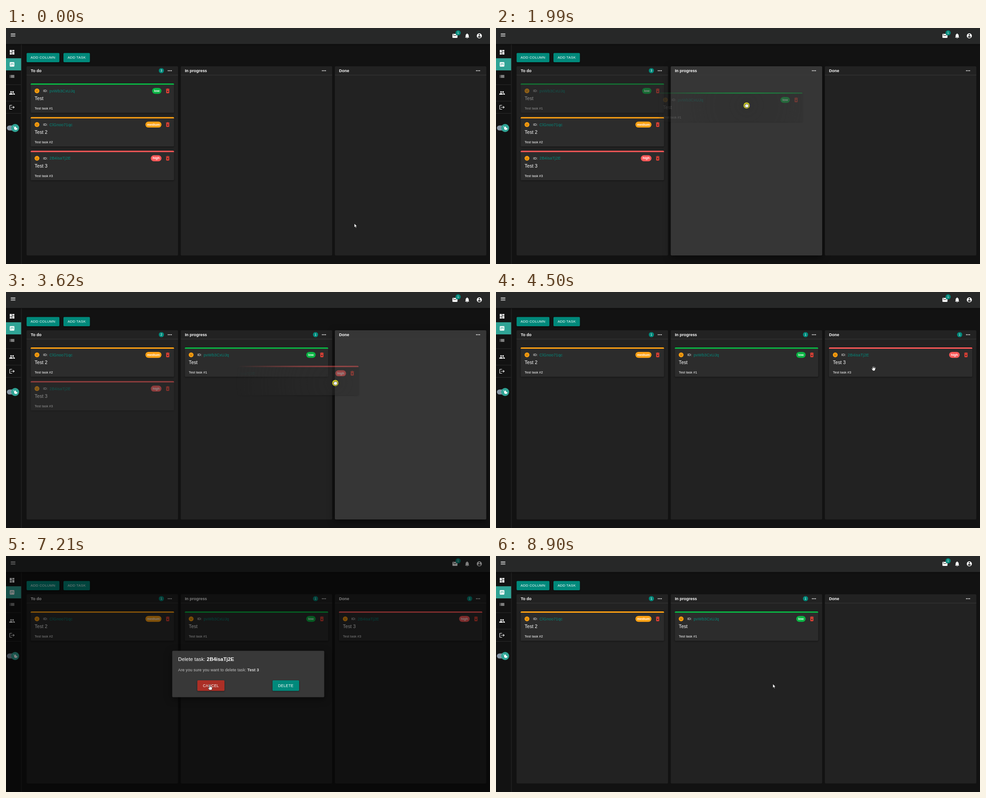
These frames come from a looping animation (1070 by 524 pixels, 9.3 s). An HTML page:

```html
<!DOCTYPE html>
<html lang="en">
<head>
<meta charset="utf-8">
<title>Task board</title>
<style>
html, body { margin: 0; width: 100%; height: 100%; overflow: hidden; background: #121212; }
svg { display: block; width: 100vw; height: 100vh; font-family: "Liberation Sans", Arial, sans-serif; fill: #fff; }
.b { font-weight: bold; }
.m { text-anchor: middle; }
.lift { filter: drop-shadow(0 1px 1.5px rgba(0,0,0,.5)); }
.high { filter: drop-shadow(0 4px 8px rgba(0,0,0,.5)); }
</style>
</head>
<body>
<svg id="stage" viewBox="0 0 1070 524" xmlns="http://www.w3.org/2000/svg"></svg>
<script>
const LOOP = 9300, STEP = 69.5;
const TEAL = '#00897b', MINT = '#30a395', RED = '#f44336';
const COL_X = [45.5, 386.3, 727], COL_W = 334.8;
const CARD_X = 9, CARD_Y = 123, CARD_W = 317, CARD_H = 65.3, PITCH = 74.8;

const ICON = {
  menu: 'M3 18h18v-2H3v2zm0-5h18v-2H3v2zm0-7v2h18V6H3z',
  grid: 'M3 13h8V3H3v10zm0 8h8v-6H3v6zm10 0h8V11h-8v10zm0-18v6h8V3h-8z',
  board: 'M5 3h14a2 2 0 0 1 2 2v14a2 2 0 0 1-2 2H5a2 2 0 0 1-2-2V5a2 2 0 0 1 2-2zM7 7v10h2V7zM11 7v5h2V7zM15 7v8h2V7z',
  list: 'M3 13h2v-2H3v2zm0 4h2v-2H3v2zm0-8h2V7H3v2zm4 4h14v-2H7v2zm0 4h14v-2H7v2zM7 7v2h14V7H7z',
  people: 'M16 11c1.66 0 3-1.34 3-3s-1.34-3-3-3-3 1.34-3 3 1.34 3 3 3zm-8 0c1.66 0 3-1.34 3-3S9.66 5 8 5 5 6.34 5 8s1.34 3 3 3zm0 2c-2.33 0-7 1.17-7 3.5V19h14v-2.5c0-2.33-4.67-3.5-7-3.5zm8 0c-.29 0-.62.02-.97.05 1.16.84 1.97 1.97 1.97 3.45V19h6v-2.5c0-2.33-4.67-3.5-7-3.5z',
  exit: 'M17 7l-1.41 1.41L18.17 11H8v2h10.17l-2.58 2.58L17 17l5-5zM4 5h8V3H4c-1.1 0-2 .9-2 2v14c0 1.1.9 2 2 2h8v-2H4V5z',
  mail: 'M20 4H4c-1.1 0-2 .9-2 2v12c0 1.1.9 2 2 2h16c1.1 0 2-.9 2-2V6c0-1.1-.9-2-2-2zm0 4l-8 5-8-5V6l8 5 8-5v2z',
  bell: 'M12 22c1.1 0 2-.9 2-2h-4c0 1.1.89 2 2 2zm6-6v-5c0-3.07-1.64-5.64-4.5-6.32V4c0-.83-.67-1.5-1.5-1.5s-1.5.67-1.5 1.5v.68C7.63 5.36 6 7.92 6 11v5l-2 2v1h16v-1l-2-2z',
  user: 'M12 2a10 10 0 1 0 0 20 10 10 0 0 0 0-20zm0 3a3 3 0 1 1 0 6 3 3 0 0 1 0-6zm0 14.2c-2.5 0-4.71-1.28-6-3.22.03-1.99 4-3.08 6-3.08s5.97 1.09 6 3.08c-1.29 1.94-3.5 3.22-6 3.22z',
  trash: 'M6 19c0 1.1.9 2 2 2h8c1.1 0 2-.9 2-2V7H6v12zm2.46-7.12l1.41-1.41L12 12.59l2.12-2.12 1.41 1.41L13.41 14l2.12 2.12-1.41 1.41L12 15.41l-2.12 2.12-1.41-1.41L10.59 14l-2.13-2.12zM15.5 4l-1-1h-5l-1 1H5v2h14V4z',
  dots: 'M6 10a2 2 0 1 0 0 4 2 2 0 0 0 0-4zm6 0a2 2 0 1 0 0 4 2 2 0 0 0 0-4zm6 0a2 2 0 1 0 0 4 2 2 0 0 0 0-4z',
  moon: 'M6.2 4.5l-.7 1.8-1.8.7 1.8.7.7 1.8.6-1.8L8.7 7l-1.9-.7zm15 8.3a6.7 6.7 0 1 1-6.6-6.6 5.8 5.8 0 0 0 6.6 6.6z'
};

const icon = (name, x, y, fill = '#fff', s = .56) =>
  `<path d="${ICON[name]}" fill="${fill}" fill-rule="evenodd" transform="translate(${x} ${y}) scale(${s}) translate(-12 -12)"/>`;
const rect = (x, y, w, h, fill, r = 0, more = '') =>
  `<rect x="${x}" y="${y}" width="${w}" height="${h}" fill="${fill}" rx="${r}" ${more}/>`;
const text = (x, y, size, str, more = '') =>
  `<text x="${x}" y="${y}" font-size="${size}" ${more}>${str}</text>`;
const badge = (x, y, id, str) =>
  `<g id="${id}"><circle cx="${x}" cy="${y}" r="5.7" fill="${TEAL}"/>${text(x, y + 2.5, 7, str, 'class="m"')}</g>`;
const button = (x, y, w, h, fill, label, size, id = '') =>
  rect(x, y, w, h, fill, 2, `class="lift" id="${id}"`) +
  text(x + w / 2, y + h / 2 + size * .355, size, label, `class="m" letter-spacing="${size * .0285}"`);

const CARDS = [
  { id: 'pvWb3CxUJq', title: 'Test', level: 'low', color: '#0ab443', pill: 20.7 },
  { id: 'ClGnoo71qc', title: 'Test 2', level: 'medium', color: '#ffa113', pill: 35.5 },
  { id: '2B4isaTj2E', title: 'Test 3', level: 'high', color: '#fb5858', pill: 23.5 }
];

const card = (c, i) => `<g id="card${i}"><g id="face${i}">
  <g class="lift">${rect(0, 0, CARD_W, CARD_H, '#2c2c2c', 2)}</g>
  <path d="M0 3V2a2 2 0 0 1 2-2H${CARD_W - 2}a2 2 0 0 1 2 2V3z" fill="${c.color}"/>
  <circle cx="14" cy="16.6" r="5.3" fill="#ffa00f"/>
  ${text(14, 19, 6.6, 'U', 'class="m" fill="#6b4300"')}
  ${text(27.6, 19.3, 7.84, 'ID:')}
  ${text(41.6, 19.8, 9, c.id, `fill="${TEAL}" letter-spacing=".1"`)}
  ${rect(289.2 - c.pill, 9.9, c.pill, 13.4, c.color, 6.7)}
  ${text(289.2 - c.pill / 2, 18.9, 7.28, c.level, 'class="m b"')}
  ${icon('trash', 303, 16.6, RED)}
  ${text(8.8, 37, 10.6, c.title)}
  ${text(8.8, 58, 7.6, 'Test task #' + (i + 1))}
</g></g>`;

const column = (name, i) => `<g transform="translate(${COL_X[i]} 0)">
  ${rect(0, 85, COL_W, 420, '#222', 2, `id="col${i}"`)}
  ${rect(0, 104, COL_W, 1, '#393939')}
  ${text(9.3, 97.7, 8.96, name, 'class="b"')}
  ${badge(298, 94.6, 'count' + i, '')}
  ${icon('dots', 316.6, 94.8)}
</g>`;

const HAND = 'M-4.6 .6C-5.4-.6-3.9-1.4-3.1-.2L-2.4.8-3.2-3.2C-3.4-4.5-2-4.6-1.7-3.4L-1.1-1.2-1-4.3C-.9-5.5.5-5.5.6-4.3L.7-1.2 1.5-3.8C1.8-4.8 3-4.5 2.8-3.4L2.4-.6 3.4-2.2C4-3.1 5-2.5 4.6-1.5L3.3 2.3 2.3 5H-1.8z';
const FIST = 'M-4.2 .2C-4.4-1-3.2-1.4-2.8-.6V-2.2C-2.6-3.5-1.3-3.4-1.1-2.6-.8-3.7.6-3.6.8-2.6 1.2-3.4 2.4-3.2 2.5-2.2 3-2.8 4.2-2.4 4.2-1.4V1.4L3.2 4.4H-2.2z';
const POINT = 'M-.9-1C-.9-2.2.9-2.2.9-1V3.2L4.9 4.1C5.8 4.4 6 5 5.9 5.8L5 10.4H-.2L-3.4 6.6C-3.8 5.6-2.6 5-1.8 5.7L-.9 6.5z';
const shape = (id, d) => `<path id="${id}" d="${d}" stroke="#111" stroke-width=".7" stroke-linejoin="round"/>`;

document.getElementById('stage').innerHTML = `
<defs>
  <radialGradient id="fade" gradientUnits="userSpaceOnUse" cx="0" cy="0" r="220">
    <stop offset="0" stop-color="#fff" stop-opacity=".55"/>
    <stop offset=".4" stop-color="#fff" stop-opacity=".4"/>
    <stop offset="1" stop-color="#fff" stop-opacity="0"/>
  </radialGradient>
  <mask id="soft" maskUnits="userSpaceOnUse" x="-20" y="-20" width="360" height="110">
    ${rect(-20, -20, 360, 110, 'url(#fade)')}
  </mask>
</defs>
${rect(0, 0, 1070, 524, '#121212')}
${rect(33.5, 36, 1, 488, '#2b2b2b')}
<g class="lift">${rect(0, 0, 1070, 35.6, '#272828')}</g>
${icon('menu', 15.6, 15.7)}
${icon('mail', 992.5, 17.4)}${badge(999.5, 10.7, 'mailCount', '1')}
${icon('bell', 1019.5, 17.4)}${icon('user', 1046.4, 17.4)}
${rect(0, 67.2, 33.5, 26.9, MINT)}
${icon('grid', 13.4, 53.9)}${icon('board', 13.4, 80.7)}${icon('list', 13.4, 107.5)}
${icon('people', 13.4, 144.2)}${icon('exit', 13.4, 176)}
${[125.3, 161.8, 189].map(y => rect(0, y, 33.5, 1, '#2b2b2b')).join('')}
${rect(2, 216.4, 24, 11.2, '#8796a5', 5.6)}
<circle cx="20.2" cy="222" r="8.9" fill="${MINT}"/>${icon('moon', 20.2, 222, '#fff', .55)}
${button(45.5, 55.4, 72.6, 20.6, TEAL, 'ADD COLUMN', 7.84)}
${button(127, 55.4, 58.5, 20.6, TEAL, 'ADD TASK', 7.84)}
${['To do', 'In progress', 'Done'].map(column).join('')}
${CARDS.map(card).join('')}
<g id="ghost" mask="url(#soft)"><use id="ghostFace"/></g>
${rect(0, 0, 1070, 524, '#000', 0, 'id="shade"')}
<g id="dialog">
  <g class="high">${rect(367.5, 210.6, 336, 102.8, '#383838', 2)}</g>
  ${text(380.6, 232.6, 11.2, 'Delete task: <tspan class="b">2B4isaTj2E</tspan>', 'letter-spacing=".08"')}
  ${text(380.6, 256.1, 8.96, 'Are you sure you want to delete task: <tspan class="b" fill="#dcdcdc">Test 3</tspan>', 'letter-spacing=".084" fill="#c3c3c3"')}
  ${button(423, 276, 60, 23.6, RED, 'CANCEL', 8.4, 'cancel')}
  ${button(589.2, 276, 58.8, 23.6, TEAL, 'DELETE', 8.4, 'remove')}
</g>
<g id="cursor">
  <circle id="press" r="6.8" fill="#d6d422"/>
  ${shape('arrow', 'M0 0V8.8L2 7 3.4 10.1 4.9 9.4 3.5 6.4H6.2z')}
  ${shape('hand', HAND)}${shape('fist', FIST)}${shape('point', POINT)}
  <g id="no" fill="none"><circle r="4.2" stroke="#222" stroke-width="2.6"/><path d="M-3-3L3 3" stroke="#222" stroke-width="2.6"/>
  <circle r="4.2" stroke="#e8e46a" stroke-width="1.2"/><path d="M-3-3L3 3" stroke="#e8e46a" stroke-width="1.2"/></g>
</g>`;

const el = {};
document.querySelectorAll('[id]').forEach(n => el[n.id] = n);
const set = (id, name, value) => el[id].setAttribute(name, value);
const show = (id, on) => set(id, 'display', on ? 'inline' : 'none');
const move = (id, x, y) => set(id, 'transform', `translate(${x} ${y})`);
const clamp = v => Math.max(0, Math.min(1, v));
const ease = v => (v = clamp(v), v * v * (3 - 2 * v));

// time, x, y
const PATH = [
  [0, 770, 434], [970, 248, 152], [1170, 248, 152], [1990, 554, 172], [2650, 554, 172],
  [3060, 320, 236], [3130, 320, 236], [3270, 342, 232], [3560, 728, 202], [4300, 835, 170],
  [4630, 835, 170], [5480, 1040, 143], [6170, 1040, 143], [6520, 711, 232],
  [7000, 450, 287], [7210, 450, 287], [7770, 612, 284], [LOOP, 612, 284]
];
const DRAGS = [
  { card: 0, from: 0, start: 1240, drop: 2060, x: 248, y: 152, top: CARD_Y },
  { card: 2, from: 0, start: 3200, drop: 4360, x: 320, y: 236, top: CARD_Y + PITCH }
];
const PRESSES = [[1170, 2060], [3130, 4360], [5620, 5760], [8500, 8570]];

function pointer(t) {
  const i = PATH.findIndex((p, n) => n && t < p[0]);
  const [t0, x0, y0] = PATH[i - 1], [t1, x1, y1] = PATH[i];
  const k = ease(Math.floor((t - t0) / STEP) * STEP / (t1 - t0));
  return [x0 + (x1 - x0) * k, y0 + (y1 - y0) * k];
}

const inside = (x, y, l, t, w, h) => x >= l && x <= l + w && y >= t && y <= t + h;

function draw(t) {
  const [x, y] = pointer(t);
  const cols = [[], [], []];
  cols[t < 2130 ? 0 : 1].push(0);
  cols[0].push(1);
  if (t < 8900) cols[t < 4430 ? 0 : 2].push(2);

  const drag = DRAGS.find(d => t >= d.start && t < d.drop);
  const open = t < 8570 ? ease((t - 5880) / 230) : 0;
  const over = COL_X.findIndex(c => inside(x, y, c, 85, COL_W, 420));
  let kind = 'arrow';

  show('card2', t < 8900);
  cols.forEach((list, c) => {
    const hot = drag && over === c && c !== drag.from;
    set('col' + c, 'fill', hot ? '#363636' : '#222');
    set('col' + c, 'class', hot ? 'high' : '');
    show('count' + c, list.length);
    el['count' + c].lastElementChild.textContent = list.length;
    list.forEach((n, row) => {
      const cx = COL_X[c] + CARD_X, cy = CARD_Y + row * PITCH;
      move('card' + n, cx, cy);
      set('card' + n, 'opacity', drag && drag.card === n ? .5 : 1);
      if (inside(x, y, cx, cy, CARD_W, CARD_H)) kind = 'hand';
      if (inside(x, y, cx + 295, cy + 8, 16, 17)) kind = 'point';
    });
  });
  const gone = Math.floor(clamp((t - 8770) / 130 + .5) * 2) / 2;
  if (t >= 8770) set('card2', 'opacity', 1 - gone * .6);

  show('ghost', drag);
  if (drag) {
    const left = COL_X[drag.from] + CARD_X;
    set('ghostFace', 'href', '#face' + drag.card);
    set('fade', 'cx', drag.x - left);
    set('fade', 'cy', drag.y - drag.top);
    move('ghost', left + x - drag.x, drag.top + y - drag.y);
    kind = over > 0 ? 'fist' : 'no';
  }

  set('shade', 'opacity', open * .5);
  show('dialog', open > 0);
  set('dialog', 'opacity', open);
  const onCancel = open === 1 && inside(x, y, 423, 276, 60, 23.6);
  const onRemove = open === 1 && inside(x, y, 589.2, 276, 58.8, 23.6);
  set('cancel', 'fill', onCancel ? '#ab2f26' : RED);
  set('remove', 'fill', onRemove ? '#006056' : TEAL);
  if (open > 0) kind = onCancel || onRemove ? 'point' : 'arrow';

  move('cursor', x, y);
  ['arrow', 'hand', 'fist', 'point', 'no'].forEach(k => show(k, k === kind));
  show('press', PRESSES.some(([a, b]) => t >= a && t < b));
  set('press', 'opacity', onRemove ? .65 : .95);
}

const begin = performance.now();
function tick() {
  draw((performance.now() - begin) % LOOP);
  requestAnimationFrame(tick);
}
tick();
</script>
</body>
</html>
```
